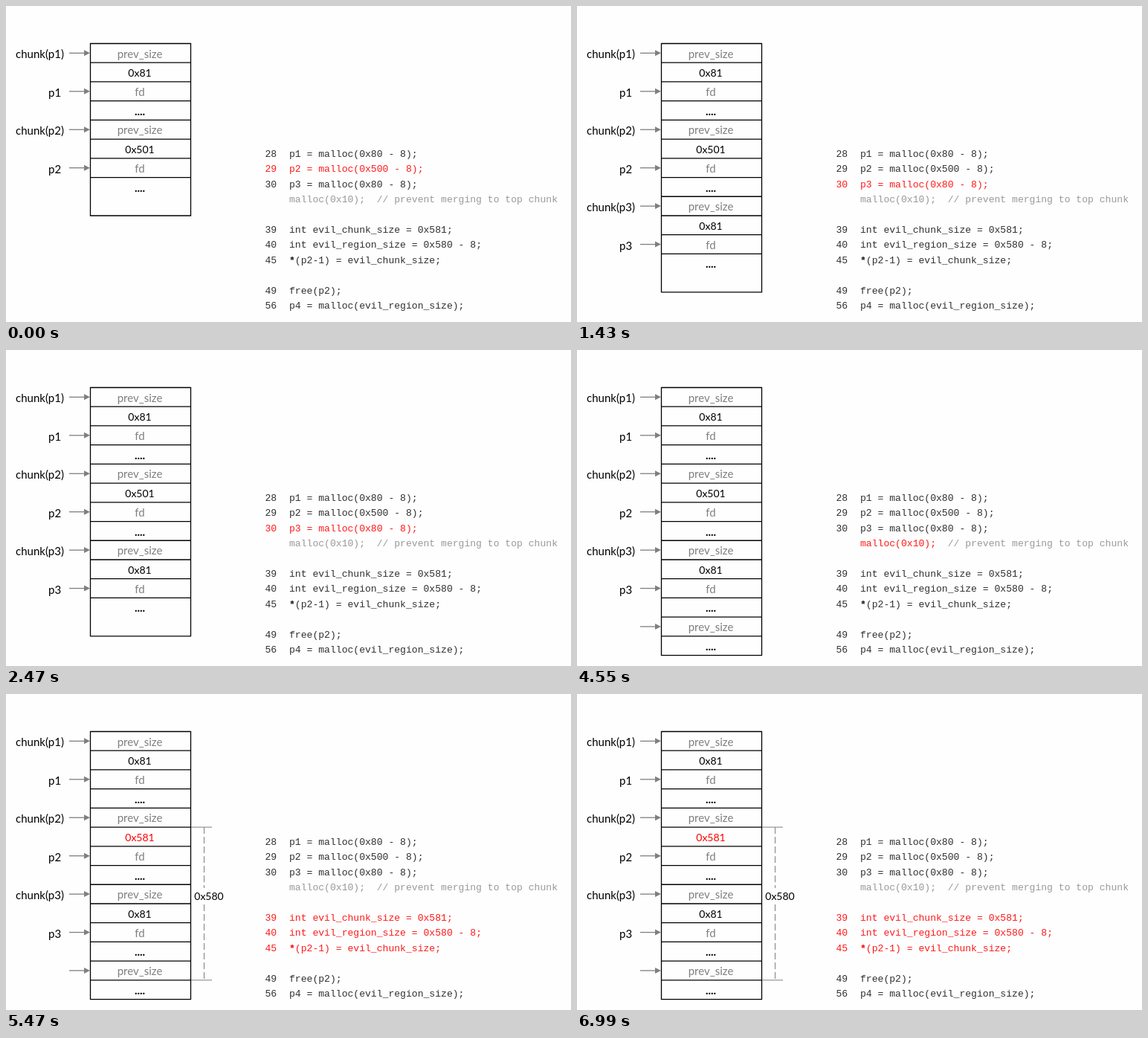
These frames come from a looping animation (760x425 px, 8000 ms). An HTML page with a canvas:

```html
<!DOCTYPE html>
<html lang="en">
<head>
<meta charset="utf-8">
<title>Heap chunks</title>
<style>
  html, body { margin: 0; width: 100%; height: 100%; overflow: hidden; background: #fefefe; }
  canvas { display: block; }
</style>
</head>
<body>
<canvas id="stage" width="760" height="425"></canvas>
<script>
const ctx = document.getElementById("stage").getContext("2d");
const LOOP = 8000, STARTS = [0, 1430, 3160, 5470];
const BLACK = "#000", GRAY = "#7f7f7f", RED = "#ff1a1a", CODE = "#303030", FADED = "#999";
const LABEL = "15px Lato, sans-serif", NUMBER = "14px Lato, sans-serif";
const DOTS = "bold 15px Lato, sans-serif", MONO = "13.08px 'Liberation Mono', monospace";
const LEFT = 113.5, RIGHT = 248.5, MIDDLE = 180;
const rowY = r => 50.5 + 25.72 * r;

const CHUNK = ["prev_size", "0x81", "fd", "...."];
const CELLS = [...CHUNK, "prev_size", "0x501", "fd", "....", ...CHUNK, "prev_size", "...."];
const POINTERS = ["chunk(p1)", "p1", "chunk(p2)", "p2", "chunk(p3)", "p3", ""];

// [line slot, line number, code, step that highlights it]
const LINES = [
  [0, "28", "p1 = malloc(0x80 - 8);"],
  [1, "29", "p2 = malloc(0x500 - 8);", 0],
  [2, "30", "p3 = malloc(0x80 - 8);", 1],
  [3, "", "malloc(0x10);", 2],
  [5, "39", "int evil_chunk_size = 0x581;", 3],
  [6, "40", "int evil_region_size = 0x580 - 8;", 3],
  [7, "45", "*(p2-1) = evil_chunk_size;", 3],
  [9, "49", "free(p2);"],
  [10, "56", "p4 = malloc(evil_region_size);"]
];

function write(text, x, y, font, color, align = "left") {
  ctx.font = font;
  ctx.fillStyle = color;
  ctx.textAlign = align;
  ctx.fillText(text, x, y);
}

function line(x1, y1, x2, y2, color, width = 1.3, dash = []) {
  ctx.strokeStyle = color;
  ctx.lineWidth = width;
  ctx.setLineDash(dash);
  ctx.beginPath();
  ctx.moveTo(x1, y1);
  ctx.lineTo(x2, y2);
  ctx.stroke();
}

function arrow(y) {
  line(85, y, 106, y, GRAY);
  ctx.fillStyle = GRAY;
  ctx.beginPath();
  ctx.moveTo(113, y);
  ctx.lineTo(105, y - 4);
  ctx.lineTo(105, y + 4);
  ctx.fill();
}

function drawMemory(step) {
  const filled = [8, 12, 14, 14][step];
  const end = [9, 13, 14, 14][step];
  for (let r = 0; r < filled; r++) {
    const text = step === 3 && r === 5 ? "0x581" : CELLS[r];
    const isNumber = text.startsWith("0x"), isDots = text === "....";
    const color = text === "0x581" ? "#f00" : isNumber || isDots ? BLACK : GRAY;
    line(LEFT, rowY(r), RIGHT, rowY(r), BLACK);
    write(text, MIDDLE, rowY(r) + 19, isNumber ? NUMBER : isDots ? DOTS : LABEL, color, "center");
  }
  line(LEFT - .6, rowY(end), RIGHT + .6, rowY(end), BLACK);
  for (const x of [LEFT, RIGHT]) line(x, rowY(0) - .6, x, rowY(end), BLACK);

  POINTERS.slice(0, [4, 6, 7, 7][step]).forEach((name, i) => {
    const y = rowY(2 * i + .5);
    arrow(y);
    write(name, name.length > 2 ? 13 : 57, y + 7, LABEL, BLACK);
  });
}

function drawBracket() {
  const top = rowY(5), bottom = rowY(13);
  for (const y of [top, bottom]) line(249, y, 277, y, GRAY, 1);
  line(266.5, top, 266.5, 261, GRAY, 1, [9, 4]);
  line(266.5, 283, 266.5, bottom, GRAY, 1, [9, 4]);
  write("0x580", 273, 277, NUMBER, BLACK, "center");
}

function drawCode(step) {
  for (const [slot, number, code, active] of LINES) {
    const y = 203 + 20.4 * slot;
    const color = active === step ? RED : number ? CODE : FADED;
    write(number, 348.5, y, MONO, color);
    write(code, 381, y, MONO, color);
    if (code[0] === "*") write("*", 381, y, "bold " + MONO, color);
    if (!number) write("// prevent merging to top chunk", 498.7, y, MONO, FADED);
  }
}

function draw(now) {
  const time = now % LOOP;
  const step = STARTS.filter(start => start <= time).length - 1;
  ctx.fillStyle = "#fefefe";
  ctx.fillRect(0, 0, 760, 425);
  drawMemory(step);
  if (step === 3) drawBracket();
  drawCode(step);
  requestAnimationFrame(() => draw(performance.now()));
}
draw(0);
</script>
</body>
</html>
```
